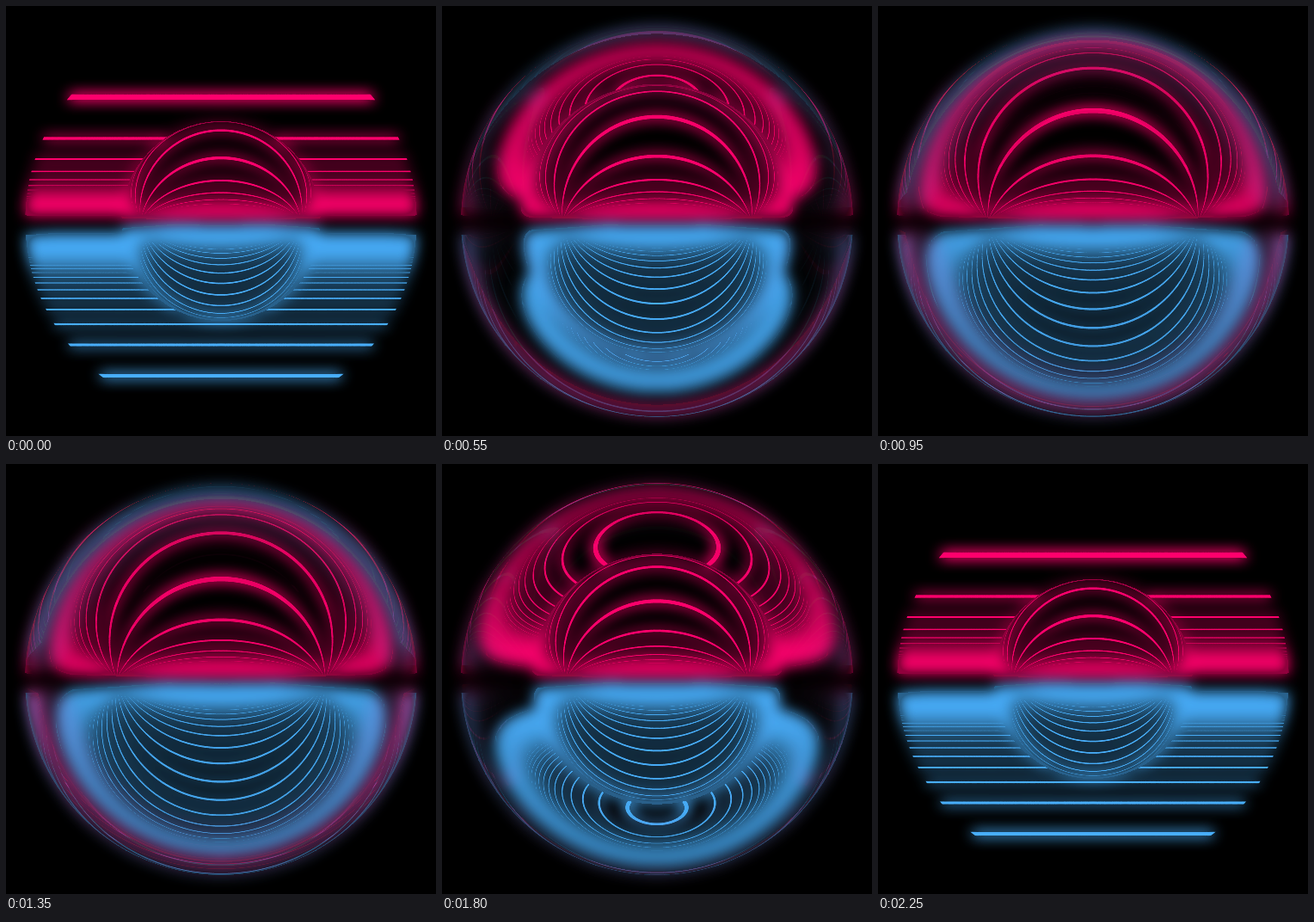
Write an HTML page with a canvas that moves like this. It is 500 px wide and 500 px high and loops after 2300 ms.

```html
<!DOCTYPE html>
<html lang="en">
<head>
<meta charset="utf-8">
<title>Neon glass sphere</title>
<style>
  html, body { margin: 0; width: 100%; height: 100%; overflow: hidden; background: #000; }
  canvas { display: block; width: 500px; height: 500px; }
</style>
</head>
<body>
<canvas id="stage" width="500" height="500"></canvas>
<script>
// A glass ball with a mirror ball inside, between a red ceiling and a blue floor
// of glowing lines. The glass index breathes while the lines roll to the viewer.
const SIZE = 500, HALF = SIZE / 2, LOOP = 2300, STEP = 50, FRAMES = LOOP / STEP;
const FOCAL = 200, RIM = 228, SUB = 8;
const GLASS = Math.sin(Math.atan(RIM / FOCAL));   // radii, with the centre at distance 1
const MIRROR = Math.sin(Math.atan(116 / FOCAL));
const CEILING = 1.44, FLOOR = 3.6, REACH = 50, LINE = 0.043, DENSE = 0.56;
const RED = [255, 0, 108], BLUE = [72, 174, 250];

const clamp = v => v < 0 ? 0 : v > 1 ? 1 : v;

function makeCanvas() {
  const c = document.createElement('canvas');
  c.width = c.height = SIZE;
  return c;
}

function fresnel(ti, tt, n) {
  const a = Math.cos(ti), b = Math.cos(tt);
  const s = (a - n * b) / (a + n * b), p = (b - n * a) / (b + n * a);
  return clamp((s * s + p * p) / 2);
}

// Everything is symmetric about the view axis, so each light path needs only
// a table over the screen radius: depth of the hit = p + q * height / |sin|.
function tracePath(bounce, n) {
  const len = (RIM + 2) * SUB;
  const p = new Float64Array(len), q = new Float64Array(len);
  const weight = new Float64Array(len), up = new Uint8Array(len);
  for (let i = 0; i < len; i++) {
    const a = Math.atan(Math.min((i + 0.5) / SUB, RIM - 0.05) / FOCAL);
    const sinI = Math.min(Math.sin(a) / GLASS, 0.99999);
    const ti = Math.asin(sinI), tt = Math.asin(sinI / n);
    const hit = Math.sin(a) / (n * MIRROR);
    const pass = hit < 1 ? 2 * (Math.asin(hit) - tt) : Math.PI - 2 * tt;
    const pos = ti - a + (bounce + 1) * pass;
    const dir = Math.PI - pos - ti;
    const f = n > 1.00001 ? fresnel(ti, tt, n) : 0;
    weight[i] = bounce < 0 ? f : (1 - f) * (1 - f) * Math.pow(f, bounce);
    const sd = Math.sin(dir), cd = Math.cos(dir);
    const inv = 1 / Math.max(Math.abs(sd), 1e-6);
    up[i] = sd > 0 ? 1 : 0;
    q[i] = cd * inv;
    p[i] = 1 - GLASS * Math.cos(pos) - GLASS * Math.sin(pos) * cd * inv * (sd > 0 ? 1 : -1);
  }
  return { p, q, weight, up, len };
}

function drawFrame(index) {
  const time = index / (FRAMES - 1);
  const n = 1 + 0.5 * Math.sin(Math.PI * time) ** 2;
  const phase = 1 - time;
  const paths = [-1, 0, 1, 2].map(k => tracePath(k, n));

  const sharp = makeCanvas(), sctx = sharp.getContext('2d');
  const img = sctx.createImageData(SIZE, SIZE), data = img.data;
  for (let y = 0; y < SIZE; y++) {
    const dy = HALF - y - 0.5;
    for (let x = HALF; x < SIZE; x++) {
      const dx = x + 0.5 - HALF, rad = Math.hypot(dx, dy);
      let red = 0, blue = 0;
      if (rad < RIM + 0.5) {
        const cot = dx / Math.abs(dy), inv = rad / Math.abs(dy);
        const i = Math.max(1, Math.floor(rad * SUB));
        for (const path of paths) {
          const w = path.weight[i];
          if (w < 0.004) continue;
          const top = (dy > 0) === (path.up[i] === 1);
          const h = top ? CEILING : FLOOR;
          if (h * cot > REACH) continue;
          const m = h * inv, z = path.p[i] + path.q[i] * m;
          if (Math.abs(z) > REACH) continue;
          const j = Math.min(i + 1, path.len - 1);
          const dp = (path.p[j] - path.p[i - 1]) * SUB / 2;
          const dq = (path.q[j] - path.q[i - 1]) * SUB / 2;
          const grad = Math.hypot(dp + dq * m, path.q[i] * m * cot / rad) + 1e-4;
          const v = z - phase, off = Math.abs(v - Math.round(v));
          let c = clamp((LINE - off) / grad + 0.9);
          c += (DENSE - c) * clamp((grad - 0.15) / 0.35);
          if (top) red += c * w; else blue += c * w;
        }
        const edge = clamp(RIM - rad + 0.5);
        red *= edge;
        blue *= edge;
      }
      const right = (y * SIZE + x) * 4, left = (y * SIZE + SIZE - 1 - x) * 4;
      for (let k = 0; k < 3; k++) {
        data[right + k] = data[left + k] = red * RED[k] + blue * BLUE[k];
      }
      data[right + 3] = data[left + 3] = 255;
    }
  }
  sctx.putImageData(img, 0, 0);

  const out = makeCanvas(), ctx = out.getContext('2d');
  ctx.drawImage(sharp, 0, 0);
  ctx.globalCompositeOperation = 'lighten';
  ctx.filter = 'blur(8px) brightness(1.75)';
  ctx.drawImage(sharp, 0, 0);
  return out;
}

const stage = document.getElementById('stage').getContext('2d');
const cache = [];
let shown = -1;

function tick() {
  const i = Math.floor(performance.now() % LOOP / STEP) % FRAMES;
  if (i !== shown) {
    cache[i] = cache[i] || drawFrame(i);
    stage.drawImage(cache[i], 0, 0);
    shown = i;
  }
  requestAnimationFrame(tick);
}
tick();
</script>
</body>
</html>
```
